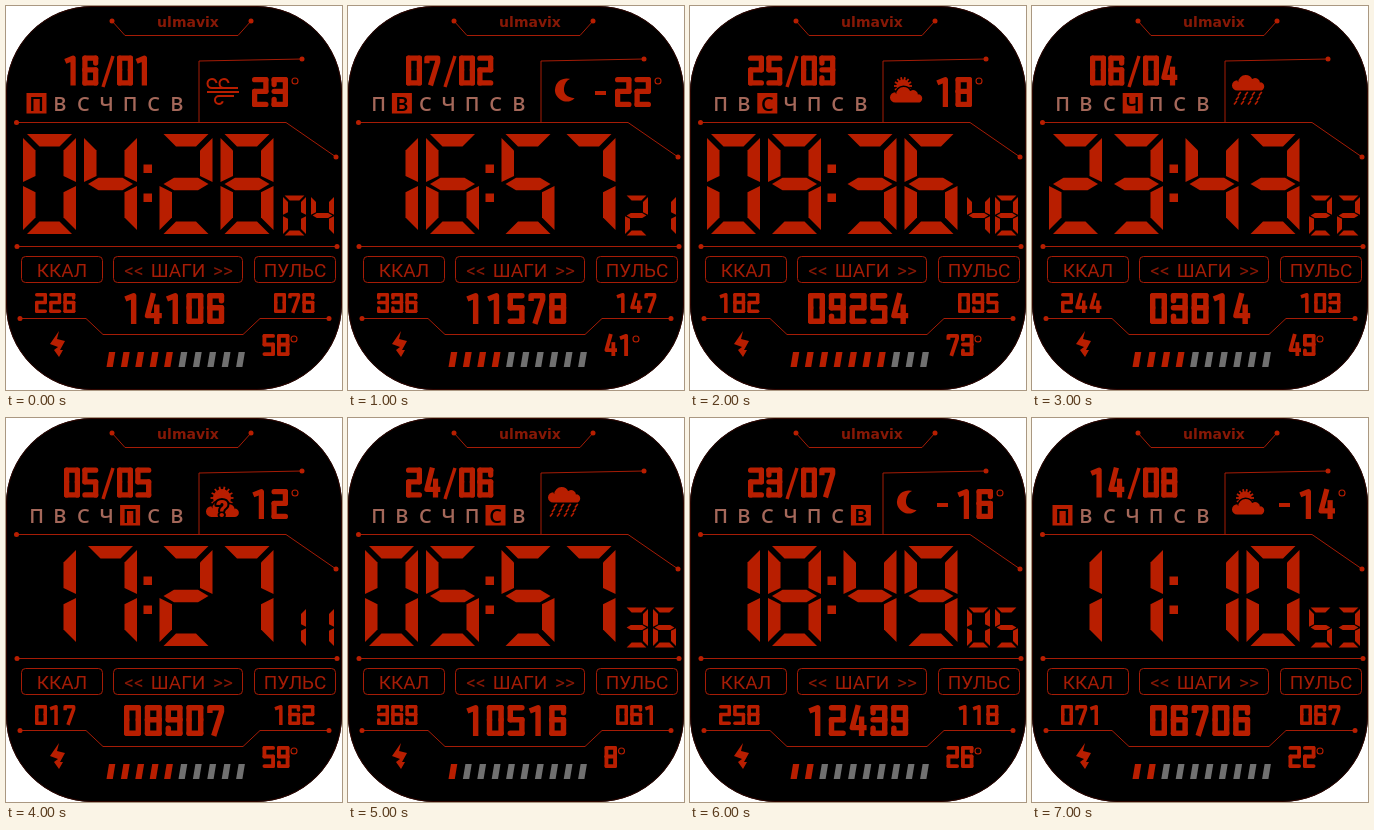
Recreate the animation shown at these times as an HTML page with a canvas. Size 336 by 384 pixels, loop 8 s.

```html
<!DOCTYPE html>
<html lang="ru">
<head>
<meta charset="utf-8">
<title>Watch face</title>
<style>
html, body { margin: 0; width: 100%; height: 100%; overflow: hidden; background: #fff; }
canvas { display: block; }
</style>
</head>
<body>
<canvas id="face" width="336" height="384"></canvas>
<script>
const ctx = document.getElementById('face').getContext('2d');
const RED = '#b81e00', LINE = '#a51c06', DARK = '#861806', DIM = '#a5685a', GRAY = '#707070';
const STEP = 1000;

// One reading per month: day, time, calories, steps, pulse, battery, weather, temperature.
const readings = `
16 04:28:04 226 14106 076 58 wind 23
07 16:57:21 336 11578 147 41 moon -22
25 09:36:48 182 09254 095 73 sunCloud 18
06 23:43:22 244 03814 103 49 rain
05 17:27:11 017 08907 162 59 unknown 12
24 05:57:36 369 10516 061 8 rain
23 18:49:05 258 12439 118 26 moon -16
14 11:10:53 071 06706 067 22 sunCloud -14`.trim().split('\n').map(row => row.split(' '));

function trace(points) {
  ctx.beginPath();
  points.forEach(([x, y]) => ctx.lineTo(x, y));
}
function fillPoly(points, color = RED) {
  trace(points);
  ctx.fillStyle = color;
  ctx.fill();
}
function fillRect(x, y, w, h, color = RED) {
  ctx.fillStyle = color;
  ctx.fillRect(x, y, w, h);
}
function strokeLine(points, color = LINE, width = 1, cap = 'butt') {
  trace(points);
  ctx.strokeStyle = color;
  ctx.lineWidth = width;
  ctx.lineCap = cap;
  ctx.stroke();
}
function dot([x, y], r = 2.5) {
  ctx.beginPath();
  ctx.arc(x, y, r, 0, Math.PI * 2);
  ctx.fillStyle = RED;
  ctx.fill();
}
function degree(x, y) {
  ctx.beginPath();
  ctx.arc(x, y, 3, 0, Math.PI * 2);
  ctx.strokeStyle = RED;
  ctx.lineWidth = 1.1;
  ctx.stroke();
}
function outline(x, y, w, h, r, color) {
  ctx.beginPath();
  ctx.roundRect(x, y, w, h, r);
  ctx.strokeStyle = color;
  ctx.lineWidth = 1;
  ctx.stroke();
}
function label(text, x, y, font, color = LINE) {
  ctx.font = font;
  ctx.textAlign = 'center';
  ctx.fillStyle = color;
  ctx.fillText(text, x, y);
}

// Lit segments per digit, clockwise from the top, then the middle one.
const lit = ['012345', '12', '01346', '01236', '1256', '02356', '023456', '012', '0123456', '012356'];

// Condensed numerals follow the segment layout; 1, 4 and 7 have their own strokes.
const ownStrokes = {
  1: [[[.1, .09], [.6, 0], [.6, 1]]],
  4: [[[.45, 0], [0, .78], [1, .78]], [[.8, .45], [.8, 1]]],
  7: [[[0, .1], [0, 0], [1, 0], [1, .15], [.4, 1]]]
};
const corners = [[0, 0], [1, 0], [1, .47], [1, 1], [0, 1], [0, .47]];
function segmentStrokes(d) {
  const on = s => lit[d].includes(s);
  const strokes = [...lit[d]].map(s => +s < 6 ? [corners[s], corners[(+s + 1) % 6]] : [corners[5], corners[2]]);
  // An open side facing a solid one ends in short hooks.
  const hook = (s, x, y) => on(s) || strokes.push([[x, y], [x, y ? .8 : .2]]);
  if (on(1) && on(2)) { hook(4, 0, 1); hook(5, 0, 0); }
  if (on(4) && on(5)) { hook(1, 1, 0); hook(2, 1, 1); }
  return strokes;
}
function number(text, x, y, w, h, pitch) {
  const t = h * .175;
  [...text].forEach((d, i) => {
    const own = ownStrokes[d];
    for (const path of own || segmentStrokes(d)) {
      const points = path.map(([u, v]) => [x + i * pitch + t / 2 + u * (w - t), y + t / 2 + v * (h - t)]);
      strokeLine(points, RED, t, own ? 'square' : 'round');
    }
  });
}

function segments(w, h, t) {
  const gap = t * .32, m = h / 2;
  const flipX = p => p.map(([x, y]) => [w - x, y]);
  const flipY = p => p.map(([x, y]) => [x, h - y]);
  const top = [[gap, 0], [w - gap, 0], [w - t - gap, t], [t + gap, t]];
  const side = [[0, gap], [t, t + gap], [t, m - t * .65], [0, m - gap / 2]];
  const half = [[gap, m], [t + gap / 2, m - t / 2], [w - t - gap / 2, m - t / 2], [w - gap, m]];
  return [top, flipX(side), flipY(flipX(side)), flipY(top), flipY(side), side, [...half, ...flipY(half).reverse()]];
}
function segmentDigit(d, x, y, shapes) {
  for (const s of lit[d]) fillPoly(shapes[s].map(([px, py]) => [x + px, y + py]));
}
const bigDigit = segments(53, 100, 12.5);
const smallDigit = segments(23, 40, 5);

function cloud(x, y, s) {
  ctx.beginPath();
  ctx.arc(x + 5 * s, y + 10 * s, 5 * s, Math.PI / 2, Math.PI * 1.5);
  ctx.arc(x + 13 * s, y + 7 * s, 7 * s, Math.PI, Math.PI * 1.9);
  ctx.arc(x + 22 * s, y + 8 * s, 5 * s, Math.PI * 1.2, 0);
  ctx.arc(x + 27 * s, y + 11 * s, 4 * s, -Math.PI / 2, Math.PI / 2);
  ctx.closePath();
  ctx.lineWidth = 3;
  ctx.strokeStyle = '#000';
  ctx.stroke();
  ctx.fillStyle = RED;
  ctx.fill();
}
function sun(x, y, r) {
  dot([x, y], r);
  for (let a = 0; a < Math.PI * 2; a += Math.PI / 7) {
    strokeLine([[x, y], [x + Math.cos(a) * (r + 2.5), y + Math.sin(a) * (r + 2.5)]], RED, 1.8);
  }
}
// A stream of air running right from a loop of radius r above (side -1) or below (side 1) it.
function gust(x, y, end, r, side) {
  ctx.beginPath();
  ctx.moveTo(end, y);
  ctx.lineTo(x, y);
  ctx.arc(x, y + side * r, r, -side * Math.PI / 2, side * Math.PI * .1, side > 0);
  ctx.strokeStyle = RED;
  ctx.lineWidth = 2;
  ctx.stroke();
}
const icons = {
  wind() {
    gust(206, 82, 231, 4.5, -1);
    gust(218, 82, 231, 4.5, -1);
    strokeLine([[201, 86], [233, 86]], RED, 2);
    gust(213, 90, 228, 4, 1);
  },
  moon() {
    ctx.fillStyle = RED;
    ctx.beginPath();
    ctx.arc(218.5, 84, 11.5, -Math.PI * .42, Math.PI * .25, true);
    ctx.quadraticCurveTo(215, 91, 216, 82);
    ctx.quadraticCurveTo(217, 75, 222, 73);
    ctx.fill();
  },
  rain() {
    cloud(200, 69, 1.04);
    for (let i = 0; i < 12; i++) {
      const row = i >> 2, x = 207 + (i & 3) * 7 - row * 2, y = 86 + row * 4.5;
      strokeLine([[x + 1.8, y], [x - 1, y + 3.5]], RED, 1.6);
    }
  },
  unknown() {
    sun(216, 80, 9);
    cloud(200, 83, 1.06);
    ctx.font = '900 24px Roboto, sans-serif';
    ctx.textAlign = 'center';
    ctx.lineWidth = 4;
    ctx.strokeStyle = '#000';
    ctx.strokeText('?', 216, 99);
    ctx.fillText('?', 216, 99);
  },
  sunCloud() {
    sun(213, 80, 6.5);
    cloud(200, 81, 1.04);
  }
};

const rules = [
  [[106, 15], [119, 29.5], [232, 29.5], [245, 15]],
  [[10.5, 116.5], [280, 116.5], [330, 151]],
  [[11, 240.5], [331, 240.5]],
  [[14, 312.5], [80, 312.5], [97, 328.5], [237, 328.5], [254, 312.5], [323, 312.5]]
];
function drawFrame() {
  fillRect(0, 0, 336, 384, '#fff');
  ctx.fillStyle = '#000';
  ctx.beginPath();
  ctx.roundRect(0, 0, 336, 384, 86);
  ctx.fill();
  outline(.5, .5, 335, 383, 85.5, '#300600');

  for (const rule of rules) {
    strokeLine(rule);
    dot(rule[0]);
    dot(rule.at(-1));
  }
  strokeLine([[193, 116], [193, 55], [296, 53]]);
  dot([296, 53]);
  label('ulmavix', 182, 21, 'bold 14px "DejaVu Sans", sans-serif', DARK);

  const font = '19px Roboto, sans-serif';
  const caption = (text, left, right) => {
    outline(left, 250.5, right - left, 26, 4, LINE);
    label(text, (left + right) / 2, 270.5, font);
  };
  caption('ККАЛ', 15.5, 96.5);
  caption('ШАГИ', 107.5, 236.5);
  caption('ПУЛЬС', 248.5, 329.5);
  label('<<', 128, 270.5, font, DARK);
  label('>>', 217, 270.5, font, DARK);

  fillPoly([[53, 325], [44, 338], [52, 341], [48, 344], [53, 351], [57, 344], [54, 344], [59, 335], [51, 333]]);
}

function drawWeek(today) {
  [...'ПВСЧПСВ'].forEach((letter, i) => {
    const x = 30.5 + i * 23.4, active = i === today;
    if (active) fillRect(x - 10, 87, 20, 20.5);
    label(letter, x, 104.5, '600 20px "Open Sans", sans-serif', active ? '#000' : DIM);
  });
}

function drawTemperature(temp) {
  const negative = temp < 0, x = negative ? 267 : 246;
  if (negative) fillRect(247, 85, 11, 4);
  number(String(Math.abs(temp)), x, 71, 16.5, 30, 19.5);
  degree(x + 43, 75);
}

function drawBattery(level) {
  number(level, 256.5, 328, 12.5, 22, 14.5);
  degree(259 + level.length * 14.5, 333);
  const filled = Math.round(level * .09);
  for (let i = 0; i < 10; i++) {
    const x = 100.5 + i * 14.4;
    fillPoly([[x + 2.5, 346], [x + 8.8, 346], [x + 6.3, 361], [x, 361]], i < filled ? RED : GRAY);
  }
}

function draw(index) {
  const [date, time, kcal, steps, pulse, battery, weather, temp] = readings[index];
  drawFrame();
  number(date, 58, 49.5, 16, 30, 18.3);
  strokeLine([[97, 81], [107, 50]], RED, 3.4);
  number(String(index + 1).padStart(2, '0'), 111, 49.5, 16, 30, 18.3);
  drawWeek(index % 7);
  icons[weather]();
  if (temp) drawTemperature(+temp);

  const digits = time.replaceAll(':', '');
  for (let i = 0; i < 4; i++) {
    segmentDigit(digits[i], 17 + i * 61 + (i > 1 ? 14.5 : 0) - (i > 1 ? i * 0 : 0), 128, bigDigit);
  }
  for (let i = 0; i < 2; i++) {
    fillRect(137.5, 158.5 + i * 29, 8.5, 8.5);
    segmentDigit(digits[4 + i], 277 + i * 28, 189.5, smallDigit);
  }

  number(kcal, 29, 287, 12, 20, 14.2);
  number(steps, 118, 287, 17, 31, 20.8);
  number(pulse, 268, 287, 12, 20, 14.2);
  drawBattery(battery);
}

let start;
function tick(now) {
  start ??= now;
  draw(Math.floor((now - start) / STEP) % readings.length);
  requestAnimationFrame(tick);
}
ctx.lineJoin = 'round';
draw(0);
requestAnimationFrame(tick);
</script>
</body>
</html>
```
